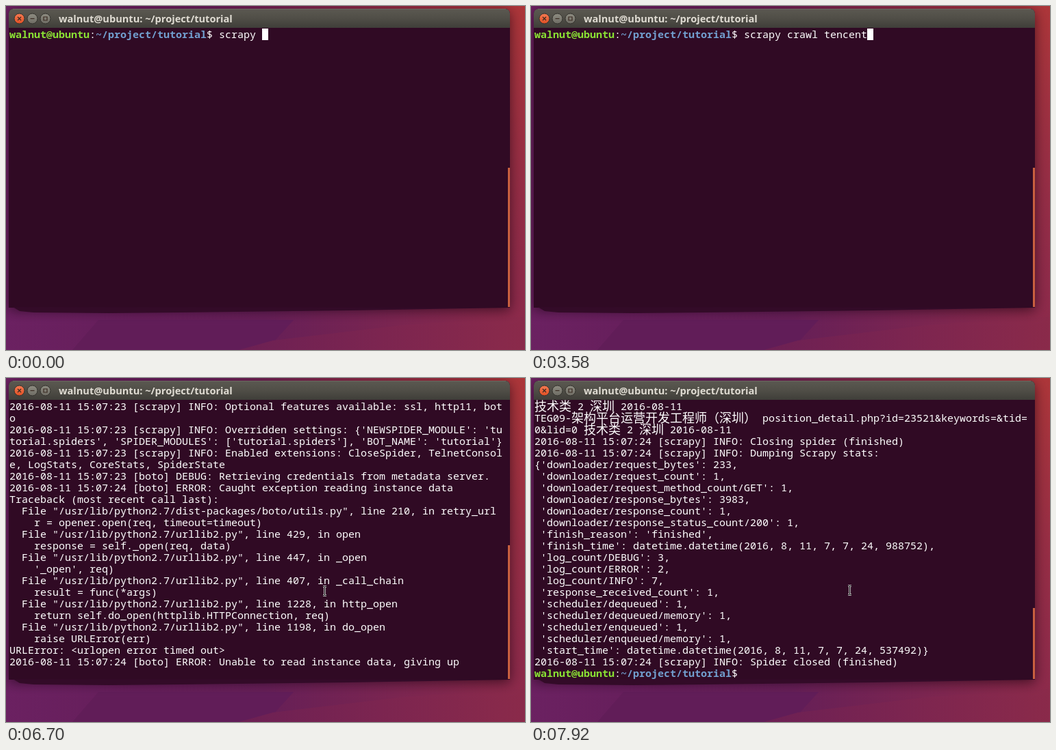
Animation of 758 by 504 pixels, one loop 8000 ms. Source, as an HTML page with a canvas:

```html
<!DOCTYPE html>
<html lang="en">
<head>
<meta charset="utf-8">
<title>Terminal crawl</title>
<style>
  html, body { margin: 0; width: 100%; height: 100%; overflow: hidden; background: #6a2160; }
  canvas { display: block; width: 758px; height: 504px; }
</style>
</head>
<body>
<canvas id="stage" width="758" height="504"></canvas>
<script>
const ctx = document.getElementById("stage").getContext("2d");
const LOOP = 8000, LEFT = 5, TOP = 33, COL = 9, ROW = 17, ROWS = 24, BASELINE = 14;
const MONO = '15px "Noto Sans Mono", "DejaVu Sans Mono", monospace';
const CJK = '18px "Noto Sans CJK SC", "Noto Sans CJK", "Noto Sans CJK JP", sans-serif';
const USER = "walnut@ubuntu", PATH = "~/project/tutorial";
const PROMPT_COLS = USER.length + PATH.length + 3;
const COMMAND = "scrapy crawl tencent";

const at = (second, source, text) => `2016-08-11 15:07:${second} [${source}] ${text}`;
const trace = (file, line, name, code) =>
  [`  File "/usr/lib/python2.7/${file}", line ${line}, in ${name}`, `    ${code}`];
const stat = (key, value) => ` '${key}': ${value},`;

const opening = [
  "",
  at(23, "scrapy", "INFO: Scrapy 1.0.3 started (bot: tutorial)"),
  at(23, "scrapy", "INFO: Optional features available: ssl, http11, boto"),
  at(23, "scrapy", "INFO: Overridden settings: {'NEWSPIDER_MODULE': 'tutorial.spiders', 'SPIDER_MODULES': ['tutorial.spiders'], 'BOT_NAME': 'tutorial'}"),
  at(23, "scrapy", "INFO: Enabled extensions: CloseSpider, TelnetConsole, LogStats, CoreStats, SpiderState"),
  at(23, "boto", "DEBUG: Retrieving credentials from metadata server."),
  at(24, "boto", "ERROR: Caught exception reading instance data"),
  "Traceback (most recent call last):",
  ...trace("dist-packages/boto/utils.py", 210, "retry_url", "r = opener.open(req, timeout=timeout)"),
  ...trace("urllib2.py", 429, "open", "response = self._open(req, data)"),
  ...trace("urllib2.py", 447, "_open", "'_open', req)"),
  ...trace("urllib2.py", 407, "_call_chain", "result = func(*args)"),
  ...trace("urllib2.py", 1228, "http_open", "return self.do_open(httplib.HTTPConnection, req)"),
  ...trace("urllib2.py", 1198, "do_open", "raise URLError(err)"),
  "URLError: <urlopen error timed out>",
  at(24, "boto", "ERROR: Unable to read instance data, giving up"),
  at(24, "scrapy", "INFO: Enabled downloader middlewares: HttpAuthMiddleware, DownloadTimeoutMiddleware, UserAgentMiddleware, RetryMiddleware, DefaultHeadersMiddleware, MetaRefreshMiddleware, HttpCompressionMiddleware, RedirectMiddleware, CookiesMiddleware, ChunkedTransferMiddleware, DownloaderStats"),
  at(24, "scrapy", "INFO: Enabled spider middlewares: HttpErrorMiddleware, OffsiteMiddleware, RefererMiddleware, UrlLengthMiddleware, DepthMiddleware"),
  at(24, "scrapy", "INFO: Enabled item pipelines: "),
  at(24, "scrapy", "INFO: Spider opened"),
  at(24, "scrapy", "INFO: Crawled 0 pages (at 0 pages/min), scraped 0 items (at 0 items/min)"),
  at(24, "scrapy", "DEBUG: Telnet console listening on 127.0.0.1:6024"),
];
const report = [
  "技术类 2 深圳 2016-08-11",
  "TEG09-架构平台运营开发工程师（深圳） position_detail.php?id=23521&keywords=&tid=",
  "0&lid=0 技术类 2 深圳 2016-08-11",
  at(24, "scrapy", "INFO: Closing spider (finished)"),
  at(24, "scrapy", "INFO: Dumping Scrapy stats:"),
  "{" + stat("downloader/request_bytes", 233).trim(),
  stat("downloader/request_count", 1),
  stat("downloader/request_method_count/GET", 1),
  stat("downloader/response_bytes", 3983),
  stat("downloader/response_count", 1),
  stat("downloader/response_status_count/200", 1),
  stat("finish_reason", "'finished'"),
  stat("finish_time", "datetime.datetime(2016, 8, 11, 7, 7, 24, 988752)"),
  stat("log_count/DEBUG", 3),
  stat("log_count/ERROR", 2),
  stat("log_count/INFO", 7),
  stat("response_received_count", 1),
  stat("scheduler/dequeued", 1),
  stat("scheduler/dequeued/memory", 1),
  stat("scheduler/enqueued", 1),
  stat("scheduler/enqueued/memory", 1),
  " 'start_time': datetime.datetime(2016, 8, 11, 7, 7, 24, 537492)}",
  at(24, "scrapy", "INFO: Spider closed (finished)"),
];
const wrap = lines => lines.flatMap(line => line.match(/.{1,80}/g) || [""]);
// The blank stretch scrolls past without ever being visible.
const log = [...wrap(opening), ...Array(10).fill(""), ...report];

// Timelines: [start in ms, value]
const typed = [[0, 7], [280, 8], [710, 9], [960, 10], [1390, 11], [1510, 12], [1630, 13], [2620, 20]];
const printed = [[0, 0], [4640, 1], [5320, 6], [5630, 9], [6700, 25], [6850, 36], [7210, log.length]];
const caret = [[0, 1], [2190, 0], [2340, 1], [2900, 0], [3580, 1], [4110, 0], [4640, 1],
  [5200, 0], [5910, 1], [6460, 0], [7090, 1], [7610, 0]];
const pointer = [[0, null], [6190, [461, 275]], [6310, [462, 279]], [6460, [462, 298]],
  [6580, [462, 304]], [7920, [462, 303]]];
const PROMPT_BACK = 7330;
const valueAt = (timeline, t) => timeline.findLast(([start]) => start <= t)[1];

function gradient(x0, y0, x1, y1, ...colors) {
  const g = ctx.createLinearGradient(x0, y0, x1, y1);
  colors.forEach((color, i) => g.addColorStop(i / (colors.length - 1), color));
  return g;
}

function polygon(fill, ...points) {
  ctx.fillStyle = fill;
  ctx.beginPath();
  points.forEach(([x, y]) => ctx.lineTo(x, y));
  ctx.fill();
}

function rect(fill, x, y, w, h) {
  ctx.fillStyle = fill;
  ctx.fillRect(x, y, w, h);
}

function drawWallpaper() {
  rect(gradient(0, 0, 758, 0, "#6b2161", "#651e5a", "#661f57", "#7a2550", "#8c2a4a"), 0, 0, 758, 504);
  polygon("#611d58", [135, 460], [420, 460], [380, 504], [97, 504]);
  polygon(gradient(340, 0, 758, 0, "#6c2054", "#7c2550", "#8a2a4a"),
    [340, 504], [390, 490], [575, 468], [758, 455], [758, 504]);
  const glow = ctx.createRadialGradient(758, 0, 0, 758, 0, 480);
  glow.addColorStop(0, "rgba(172,54,56,1)");
  glow.addColorStop(1, "rgba(150,46,66,0)");
  rect(glow, 0, 0, 758, 504);
}

function drawButton(x, fill, glyph) {
  ctx.beginPath();
  ctx.arc(x, 18.5, 7.5, 0, 7);
  ctx.fillStyle = fill;
  ctx.fill();
  ctx.strokeStyle = "#33322d";
  ctx.lineWidth = 1;
  ctx.stroke();
  ctx.strokeStyle = "#3a2a22";
  ctx.lineWidth = 1.2;
  ctx.stroke(new Path2D(glyph));
}

function drawWindow() {
  ctx.save();
  ctx.shadowColor = "rgba(20,0,12,.6)";
  ctx.shadowBlur = 18;
  ctx.shadowOffsetY = 4;
  ctx.fillStyle = "#300a24";
  ctx.beginPath();
  ctx.roundRect(4, 4, 732, 438, [7, 7, 0, 0]);
  ctx.fill();
  ctx.restore();
  polygon("#330b28", [10, 441], [20, 447], [40, 449], [150, 450], [255, 449], [500, 446], [736, 442]);

  ctx.fillStyle = gradient(0, 4, 0, 32, "#5b5951", "#504e47", "#3f3e39");
  ctx.beginPath();
  ctx.roundRect(4, 4, 732, 28, [7, 7, 0, 0]);
  ctx.fill();
  rect("#6a685f", 10, 4, 720, 1);
  drawButton(19.5, gradient(0, 11, 0, 26, "#f47b53", "#e04f24"), "M17 16l5 5m0-5l-5 5");
  const grey = gradient(0, 11, 0, 26, "#8f8d82", "#6e6c64");
  drawButton(38.5, grey, "M35.5 18.5h6");
  drawButton(57.5, grey, "M55 16h5v5h-5z");
  ctx.font = 'bold 14.6px "Noto Sans", "Open Sans", sans-serif';
  ctx.fillStyle = "#dfdbd2";
  ctx.fillText(`${USER}: ${PATH}`, 77, 24);
}

// Draws text on the character grid and returns the next column.
function drawText(text, col, row, color = "#fff", weight = "") {
  ctx.fillStyle = color;
  for (const run of text.match(/[\u3000-\uffef]+|[^\u3000-\uffef]+/g) || []) {
    const wide = run[0] >= "\u3000";
    ctx.font = `${weight} ${wide ? CJK : MONO}`;
    ctx.fillText(run, LEFT + col * COL, TOP + row * ROW + BASELINE + (wide ? 1 : 0));
    col += run.length * (wide ? 2 : 1);
  }
  return col;
}

function drawPrompt(row, command) {
  let col = drawText(USER, 0, row, "#8ae234", "bold");
  col = drawText(":", col, row);
  col = drawText(PATH, col, row, "#729fcf", "bold");
  drawText("$ " + command, col, row);
}

function drawPointer([x, y]) {
  const beam = new Path2D(`M${x + 1} ${y + 1.5}h2l.5 .5l.5 -.5h2M${x + 3.5} ${y + 2}v12M${x + 1} ${y + 14.5}h2l.5 -.5l.5 .5h2`);
  for (const [color, width] of [["#e8e8e8", 2.6], ["#000", 1]]) {
    ctx.strokeStyle = color;
    ctx.lineWidth = width;
    ctx.stroke(beam);
  }
}

function draw(t) {
  drawWallpaper();
  drawWindow();

  const count = valueAt(printed, t);
  const scroll = Math.max(0, count - ROWS + 1);
  const command = COMMAND.slice(0, valueAt(typed, t));
  if (!scroll) drawPrompt(0, command);
  log.slice(scroll, count).forEach((line, row) => drawText(line, 0, row));

  let caretCol = count ? 0 : PROMPT_COLS + command.length;
  if (t >= PROMPT_BACK) {
    drawPrompt(count - scroll, "");
    caretCol = PROMPT_COLS;
  }
  if (valueAt(caret, t)) rect("#fff", LEFT + caretCol * COL, TOP + (count - scroll) * ROW, COL, ROW);

  const track = ROWS * ROW;
  const thumb = Math.round(track * ROWS / (2 * ROWS + scroll));
  rect("#c8603f", 733, TOP + track - thumb, 3, thumb);

  const position = valueAt(pointer, t);
  if (position) drawPointer(position);
}

const start = performance.now();
function tick() {
  draw((performance.now() - start) % LOOP);
  requestAnimationFrame(tick);
}
tick();
</script>
</body>
</html>
```
